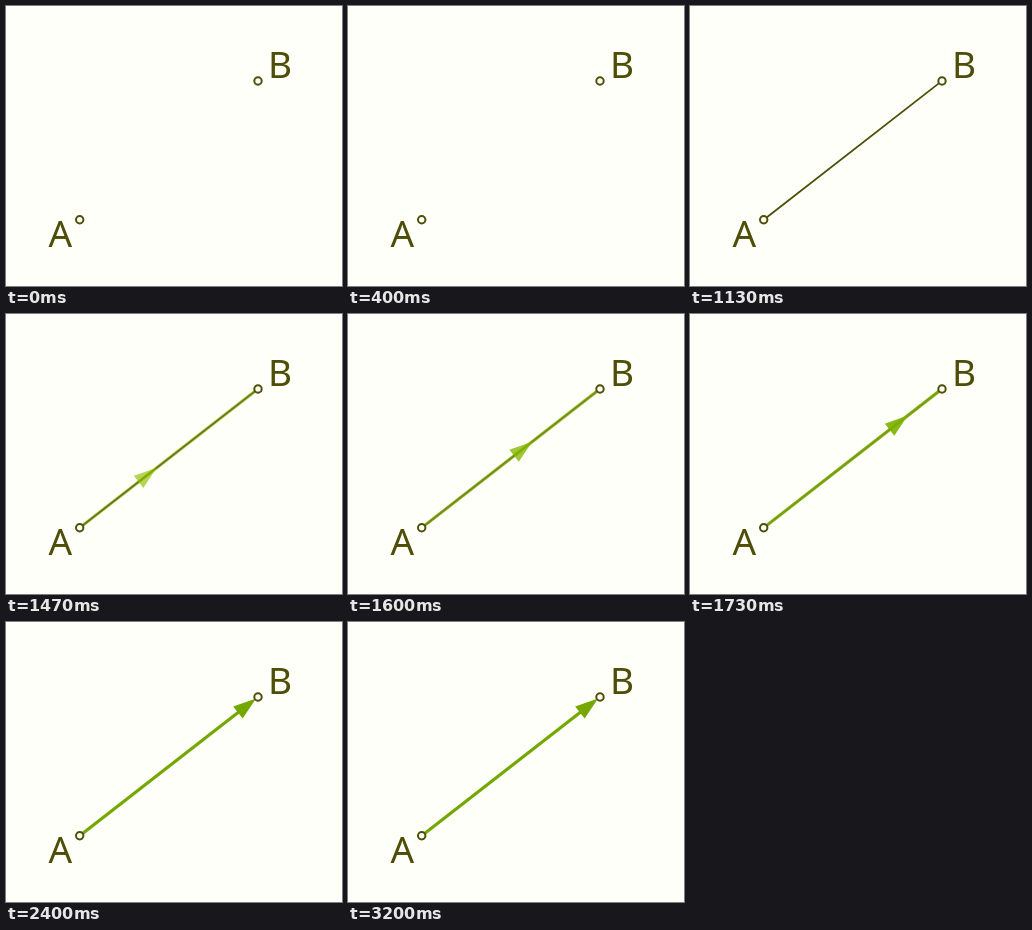
Animation of 336x280 px, one loop 3.27 s. Source, as an HTML page:

```html
<!DOCTYPE html>
<html>
<head>
<meta charset="utf-8">
<style>
html, body { margin: 0; width: 100%; height: 100%; overflow: hidden; background: #fffffa; }
svg { display: block; width: 336px; height: 280px; }
text { font: 37px "Noto Sans", "Open Sans", sans-serif; fill: #4e4e08; }
circle { fill: #fffffa; stroke: #4e4e08; stroke-width: 2; }
</style>
</head>
<body>
<svg viewBox="0 0 336 280">
  <g transform="translate(73.7 213.7) rotate(-37.9)">
    <line id="glow" stroke-width="3.2"/>
    <line id="segment" stroke="#4e4e08" stroke-width="1.8"/>
    <path id="head" d="M0 0L-23 -7.7V7.7Z"/>
  </g>
  <circle cx="73.7" cy="213.7" r="3.7"/>
  <circle cx="252" cy="75" r="3.7"/>
  <text x="42.4" y="240.6">A</text>
  <text x="262" y="71.6">B</text>
</svg>
<script>
const LOOP = 3270, STEP = 1000 / 15, LENGTH = 226;
const get = id => document.getElementById(id);
const segment = get('segment'), glow = get('glow'), head = get('head');
const progress = (t, start, end) => Math.min(1, Math.max(0, (t - start) / (end - start)));
const mix = (a, b, p) => a + (b - a) * p;

function draw(now) {
  // The motion advances at 15 steps per second.
  const t = Math.floor((now % LOOP + 4) / STEP) * STEP;
  const drawn = progress(t, 503, 1130);
  const p = progress(t, 1160, 1870);
  const green = `rgb(${mix(160, 116, p)},${mix(208, 168, p)},0)`;
  const alpha = p ** 0.5;

  segment.setAttribute('x2', drawn * LENGTH);
  segment.setAttribute('opacity', drawn ? 1 - p ** 1.5 : 0);

  glow.setAttribute('x2', p < 1 ? LENGTH : 208);
  glow.setAttribute('stroke', green);
  glow.setAttribute('opacity', alpha);

  head.setAttribute('fill', green);
  head.setAttribute('opacity', alpha);
  head.setAttribute('transform', `translate(${Math.min(p * LENGTH, 223.5)} 0)`);
  requestAnimationFrame(draw);
}
requestAnimationFrame(draw);
</script>
</body>
</html>
```
